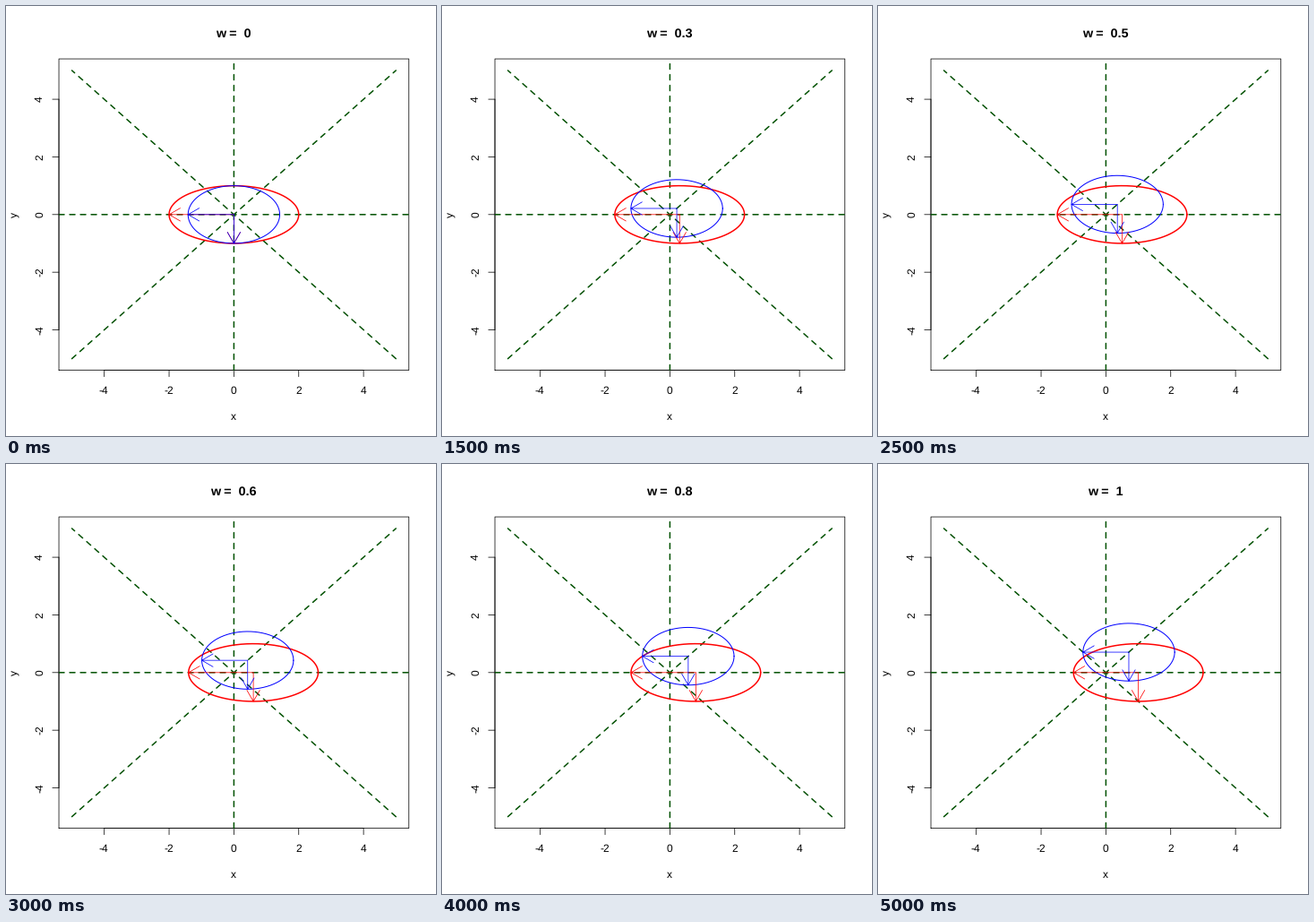
Recreate the animation shown at these times as a matplotlib script. Size 480 by 480 pixels, loop 5500 ms.

```python
import numpy as np
import matplotlib as mpl
import matplotlib.pyplot as plt
from matplotlib.animation import FuncAnimation
from matplotlib.patches import Rectangle

mpl.rcParams["font.family"] = "Liberation Sans"
mpl.rcParams["text.hinting"] = "no_hinting"
mpl.rcParams["text.hinting_factor"] = 8

SIZE, STEPS = 480, 11
LEFT, RIGHT, TOP, BOTTOM = 59.04, 449.76, 59.04, 406.56
LIMIT = 5.4
HEAD = 14.4
THIN, MEDIUM, THICK = 0.75, 1.0, 1.5
GREEN = "#005000"
TICKS = (-4, -2, 0, 2, 4)

fig = plt.figure(figsize=(SIZE / 72, SIZE / 72), dpi=72, facecolor="white")
ax = fig.add_axes([0, 0, 1, 1])
ax.set(xlim=(0, SIZE), ylim=(SIZE, 0))
ax.axis("off")


def px(x):
    return LEFT + (np.asarray(x) + LIMIT) * (RIGHT - LEFT) / (2 * LIMIT)


def py(y):
    return BOTTOM - (np.asarray(y) + LIMIT) * (BOTTOM - TOP) / (2 * LIMIT)


def line(xs, ys, color="black", lw=THIN, **kw):
    return ax.plot(xs, ys, color=color, lw=lw, snap=False, solid_capstyle="round",
                   solid_joinstyle="round", dash_capstyle="round", **kw)[0]


def label(x, y, text, size=12, **kw):
    return ax.text(x, y, text, size=size, ha="center", va="baseline",
                   rotation_mode="anchor", **kw)


def ellipse(cx, cy, rx, ry):
    t = np.linspace(0, 2 * np.pi, 361)
    return px(cx + rx * np.cos(t)), py(cy + ry * np.sin(t))


def arrow(x0, y0, x1, y1):
    """Shaft plus an open head with 30 degree barbs, in pixels."""
    x0, y0, x1, y1 = px(x0), py(y0), px(x1), py(y1)
    back = np.arctan2(y0 - y1, x0 - x1)
    a, b = back - np.pi / 6, back + np.pi / 6
    xs = [x0, x1, np.nan, x1 + HEAD * np.cos(a), x1, x1 + HEAD * np.cos(b)]
    ys = [y0, y1, np.nan, y1 + HEAD * np.sin(a), y1, y1 + HEAD * np.sin(b)]
    return xs, ys


# frame and axes
line([LEFT, RIGHT, RIGHT, LEFT, LEFT], [BOTTOM, BOTTOM, TOP, TOP, BOTTOM])
line(px([-4, 4]), [BOTTOM] * 2)
line([LEFT] * 2, py([-4, 4]))
for v in TICKS:
    line([px(v)] * 2, [BOTTOM, BOTTOM + 7.2])
    line([LEFT, LEFT - 7.2], [py(v)] * 2)
    label(px(v) - 0.5, 433, str(v))
    label(41, py(v), str(v), rotation=90)
label(px(0) - 0.5, 462, "x")
label(12, py(0), "y", rotation=90)

# dashed guides
region = Rectangle((LEFT, TOP), RIGHT - LEFT, BOTTOM - TOP, transform=ax.transData)
for xs, ys in (((-LIMIT, LIMIT), (0, 0)), ((0, 0), (-LIMIT, LIMIT)),
               ((-5, 5), (-5, 5)), ((5, -5), (-5, 5))):
    guide = line(px(xs), py(ys), GREEN, THICK, ls=(0, (4, 4)))
    guide.set_clip_path(region)

title = label(px(0) - 0.5, 35, "", 14.4, weight="bold")
red_ring = line([], [], "red", THICK)
blue_ring = line([], [], "blue", MEDIUM)
red_arrows = [line([], [], "red") for _ in range(2)]
blue_arrows = [line([], [], "blue") for _ in range(2)]


def place(ring, arrows, cx, cy, rx, ry):
    ring.set_data(*ellipse(cx, cy, rx, ry))
    arrows[0].set_data(*arrow(cx, cy, cx - rx, cy))
    arrows[1].set_data(*arrow(cx, cy, cx, cy - ry))


def update(i):
    w = i / (STEPS - 1)
    d = w / np.sqrt(2)
    title.set_text(f"w =  {w:g}")
    place(red_ring, red_arrows, w, 0, 2, 1)
    place(blue_ring, blue_arrows, d, d, np.sqrt(2), 1)
    return [title, red_ring, blue_ring, *red_arrows, *blue_arrows]


anim = FuncAnimation(fig, update, frames=STEPS, interval=500, repeat=True,
                     repeat_delay=0, blit=False)
plt.show()
```
